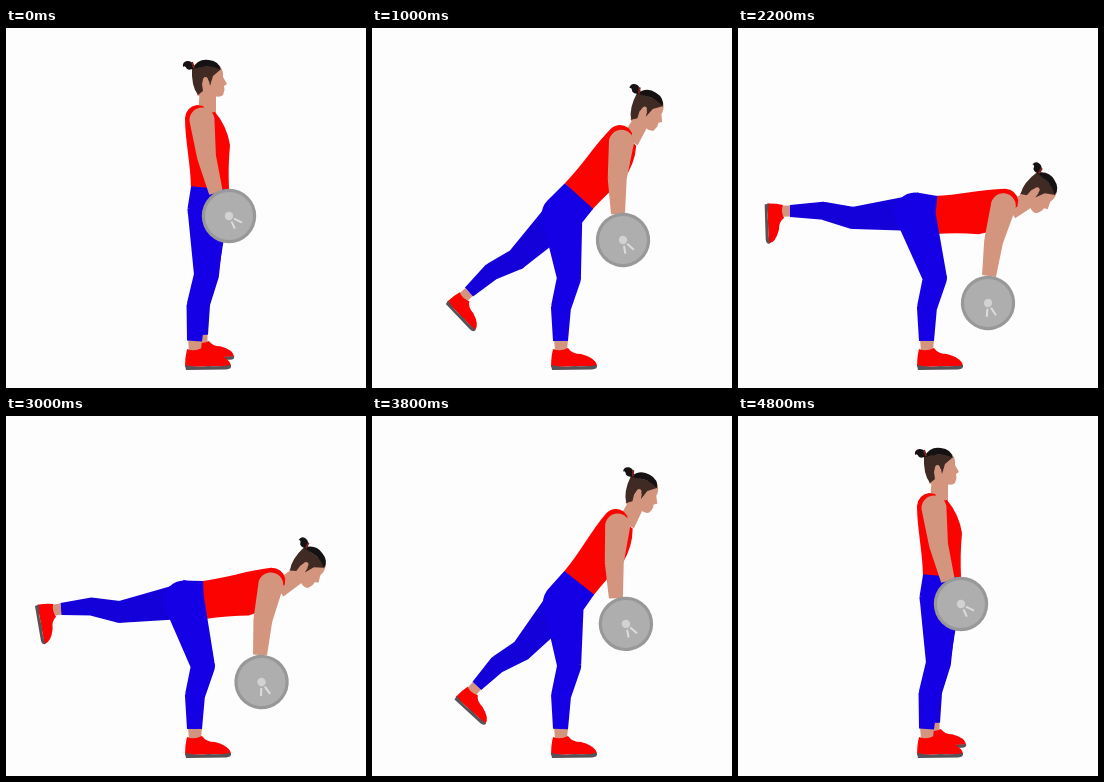
An HTML page for the animation above (4900 ms loop, 360 by 360 pixels).

```html
<!DOCTYPE html>
<html lang="en">
<head>
<meta charset="utf-8">
<title>Single-leg deadlift</title>
<style>
  html, body { margin: 0; width: 100%; height: 100%; overflow: hidden; background: #fdfdfd; }
  svg { display: block; width: 100vw; height: 100vh; }
  .skin { fill: #d4957f; }
  .blue { fill: #1500e6; }
  .blue-far { fill: #1400d8; }
  .red { fill: #fb0300; }
  .sole { fill: #575257; }
</style>
</head>
<body>
<svg viewBox="0 0 360 360">
  <defs>
    <g id="shoe">
      <path class="red" d="M-7 8Q0 11 8 7Q12 13 21 13Q36 17 37 25L-9 26Q-9 16 -7 8Z"/>
      <path class="sole" d="M-9 24Q4 27 14 25Q26 26 37 24Q38 28 32 28.5L-8 29Z"/>
    </g>
  </defs>
  <path id="farAnkle" class="skin"/>
  <use id="farShoe" href="#shoe"/>
  <path id="farLeg" class="blue-far"/>
  <path class="skin" d="M182 311H196L195 323H183Z"/>
  <use href="#shoe" transform="translate(188 313)"/>
  <path id="neck" class="skin"/>
  <g id="head">
    <path class="skin" d="M-2 -14L15 -16Q19 -10 18 -5L22 2L19 4L19.5 8L18 13Q15 16 9 14L3 19L-8 13Z"/>
    <path fill="#402a24" d="M-13 -14Q-14 4 -7 13L-2 9L-3 2Q-1 -6 4 -1L5 4L8 -6L15 -12L14 -17Z"/>
    <path fill="#161213" d="M-13 -13Q-7 -24 4 -22Q14 -21 16 -12Q8 -17 -2 -15Z"/>
    <path fill="#161213" d="M-10 -15Q-13 -22 -18 -21Q-23 -20 -22 -15Q-20 -17 -18 -13Q-14 -11 -10 -15Z"/>
    <path d="M-13 -20L-11 -14" stroke="#7c2420" stroke-width="2"/>
    <ellipse class="skin" cx="0.5" cy="0" rx="2.8" ry="5"/>
  </g>
  <path id="torso" class="red" d="M-19 1C-19 -22 -25 -48 -25 -70Q-24 -81 -13 -83L-7 -82Q-3 -74 5 -76Q17 -62 20 -43Q18 -22 19 1Z"/>
  <path id="nearLeg" class="blue"/>
  <path id="arm" class="skin"/>
  <g id="plate">
    <circle r="27.2" fill="#989898"/>
    <circle r="24" fill="#aeaeae"/>
    <path d="M5 2.6L13 6.6M2.5 5.4L5.8 12.6" stroke="#dcdcdc" stroke-width="2"/>
    <circle r="4.2" fill="#d2d2d2"/>
  </g>
</svg>
<script>
const LOOP = 4900, STEP = 100, TURN = 2400, END = 4800;

// time, waist x y, lean, hip x y, far knee x y, far ankle x y, far foot angle,
// plate x y angle, head x y angle, wrist x y
const POSES = [
  [0,    204, 160, 0,    202, 182, 202, 247, 196, 307, 0,  223, 188, 0,  199, 54, 0,   210, 165],
  [600,  207, 162, 20,   198, 184, 178, 246, 150, 293, 24, 237, 192, 5,  236, 57, 10,  231, 168],
  [1000, 207, 168, 45,   190, 187, 145, 231, 97, 264, 47,  251, 212, 15, 271, 83, 25,  246, 186],
  [1400, 203, 176, 67,   182, 184, 125, 211, 68, 223, 65,  256, 240, 20, 293, 120, 40, 253, 213],
  [1750, 198, 184, 84,   178, 185, 114, 196, 55, 193, 81,  252, 266, 27, 298, 150, 44, 254, 239],
  [2200, 197.5, 187, 89, 177, 185, 115, 190, 52, 183, 89,  250, 275, 30, 297, 163, 50, 251, 248],
  [2400, 197, 188, 90,   177, 185, 115, 189, 51, 181, 90,  249, 277, 31, 297, 165, 51, 250, 250]
];

const el = id => document.getElementById(id);
const place = (id, x, y, angle, scale = 1) =>
  el(id).setAttribute('transform', `translate(${x} ${y}) rotate(${angle}) scale(${scale})`);

function slope(i, c) {
  const a = POSES[i - 1], b = POSES[i + 1];
  return a && b ? (b[c] - a[c]) / (b[0] - a[0]) : 0;
}

// Cubic Hermite interpolation, at rest at both ends
function poseAt(u) {
  let i = 0;
  while (i < POSES.length - 2 && u > POSES[i + 1][0]) i++;
  const a = POSES[i], b = POSES[i + 1], span = b[0] - a[0];
  const s = (u - a[0]) / span, s2 = s * s, s3 = s2 * s;
  return a.map((v, c) =>
    v + (b[c] - v) * (3 * s2 - 2 * s3) +
    span * (slope(i, c) * (s3 - 2 * s2 + s) + slope(i + 1, c) * (s3 - s2))).slice(1);
}

function rotated(x, y, angle, ox, oy) {
  const r = angle * Math.PI / 180, c = Math.cos(r), s = Math.sin(r);
  return [ox + x * c - y * s, oy + x * s + y * c];
}

// Tapered chain through [x, y, radius] nodes: round joints, flat ends
function limb(id, nodes) {
  let d = '';
  nodes.slice(1).forEach(([qx, qy, qr], i) => {
    const [px, py, pr] = nodes[i];
    const len = Math.hypot(qx - px, qy - py) || 1;
    const nx = (py - qy) / len, ny = (qx - px) / len;
    d += `M${px + nx * pr} ${py + ny * pr}L${qx + nx * qr} ${qy + ny * qr}` +
         `L${qx - nx * qr} ${qy - ny * qr}L${px - nx * pr} ${py - ny * pr}Z`;
    if (i) d += `M${px - pr} ${py}a${pr} ${pr} 0 1 0 ${2 * pr} 0a${pr} ${pr} 0 1 0 ${-2 * pr} 0Z`;
  });
  el(id).setAttribute('d', d);
}

function calf(kx, ky, ax, ay, r) {
  const len = Math.hypot(ax - kx, ay - ky);
  return [kx + (ax - kx) * .48 - (ay - ky) / len * 4, ky + (ay - ky) * .48 + (ax - kx) / len * 4, r];
}

function draw(time) {
  const back = time > TURN ? Math.sin(Math.PI * (time - TURN) / TURN) : 0;
  const u = time > TURN ? Math.max(0, END - time - 70 * back) : time;
  const [wx, wy, lean, hx, hy, kx, ky, ax, ay, foot, px, py, spin, ex, ey, nod, rx, ry] = poseAt(u);
  const nearX = 200 - 3 * Math.min(u / 1000, 1), nearY = 247 + 3 * Math.min(u / 1000, 1);
  const onTorso = (x, y) => rotated(x, y, lean, wx, wy);

  limb('farAnkle', [[ax, ay, 5.5], [...rotated(0, 11, foot, ax, ay), 5.5]]);
  place('farShoe', ax, ay, foot, .87);
  limb('farLeg', [[ax, ay, 6], calf(kx, ky, ax, ay, 9), [kx, ky, 11], [hx, hy, 18], [wx, wy, 15]]);
  limb('nearLeg', [[188.5, 313, 7.5], calf(nearX, nearY, 188.5, 313, 10), [nearX, nearY, 12],
                   [hx, hy, 20.5], [wx, wy, 19]]);

  limb('neck', [[...onTorso(-3, -75), 9], [...rotated(3, 7, nod, ex, ey), 8]]);
  place('head', ex, ey, nod);
  place('torso', wx, wy, lean);

  const [sx, sy] = onTorso(-8, -68);
  limb('arm', [[...onTorso(-8, -70), 12], [sx, sy, 12.5],
               [(sx + rx) / 2 - 2.5, (sy + ry) / 2, 9.5], [rx, ry, 7]]);
  place('plate', px + 5 * back, py, spin);
}

function tick() {
  draw(Math.floor(performance.now() % LOOP / STEP) * STEP);
  requestAnimationFrame(tick);
}
tick();
</script>
</body>
</html>
```
